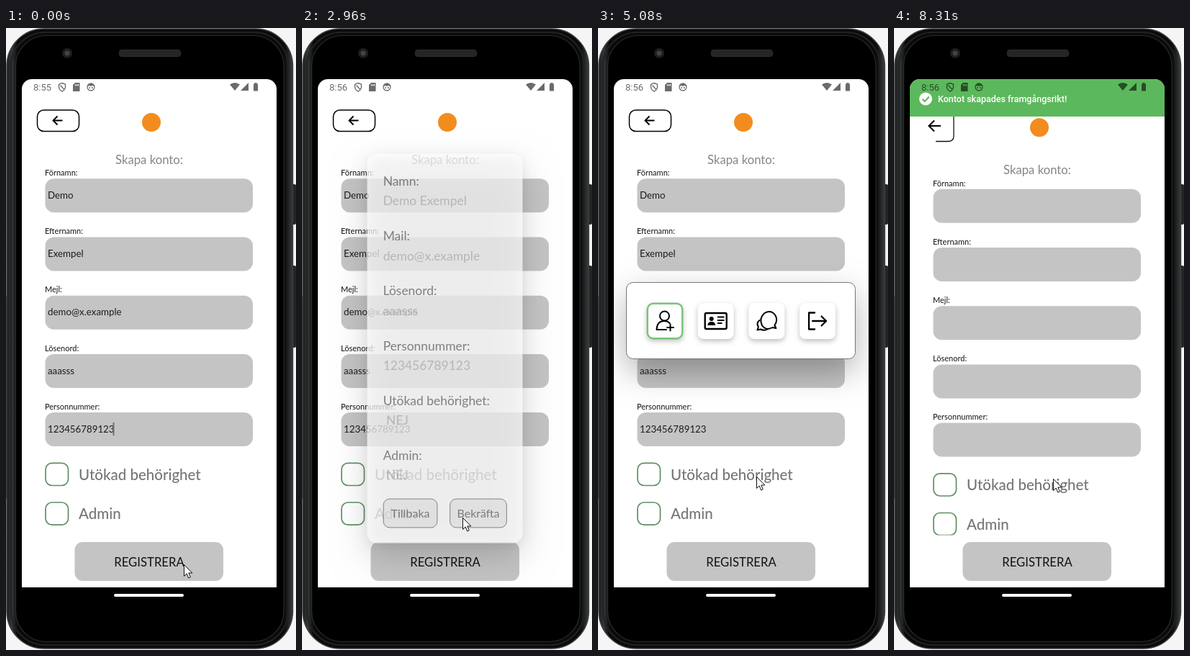
An HTML page with a canvas for the animation above (8.7 s loop, 403 by 864 pixels).

```html
<!DOCTYPE html>
<html lang="sv">
<head>
<meta charset="utf-8">
<title>Skapa konto</title>
<style>
html, body { margin: 0; width: 100%; height: 100%; overflow: hidden; background: #f5f5f5; }
canvas { display: block; width: 403px; height: 864px; }
</style>
</head>
<body>
<canvas id="stage"></canvas>
<script>
const W = 403, H = 864, LOOP = 8700;
const canvas = document.getElementById('stage');
const c = canvas.getContext('2d');
const dpr = window.devicePixelRatio || 1;
canvas.width = W * dpr;
canvas.height = H * dpr;

const GREY = '#c4c4c4', GREEN = '#5cb85c';
const FIELDS = [
  ['Förnamn:', 'Demo'],
  ['Efternamn:', 'Exempel'],
  ['Mejl:', 'demo@x.example'],
  ['Lösenord:', 'aaasss'],
  ['Personnummer:', '123456789123']
];
const SUMMARY = [
  ['Namn:', 'Demo Exempel'],
  ['Mail:', 'demo@x.example'],
  ['Lösenord:', 'aaasss'],
  ['Personnummer:', '123456789123'],
  ['Utökad behörighet:', ' NEJ'],
  ['Admin:', ' NEJ']
];
const POINTER = [
  [0, 247, 745], [30, 246, 745], [490, 222, 737], [1600, 222, 737], [1630, 222, 733],
  [2450, 220, 683], [2550, 220, 683], [2740, 223, 680], [3770, 223, 680],
  [4590, 220, 648], [4690, 220, 648], [5080, 220, 623], [5760, 220, 623], [5900, 221, 626]
];
const CARET_ON = [[0, 700], [3480, 3920], [4340, 4800], [5270, 5780], [5960, 6440], [6920, 7500], [7850, 8310]];

const ramp = (t, a, b) => Math.min(1, Math.max(0, (t - a) / (b - a)));
const smooth = p => p * p * (3 - 2 * p);

function box(x, y, w, h, r, fill, stroke, lw = 1) {
  c.beginPath();
  c.roundRect(x, y, w, h, r);
  if (fill) { c.fillStyle = fill; c.fill(); }
  if (stroke) { c.strokeStyle = stroke; c.lineWidth = lw; c.stroke(); }
}

function text(s, x, y, size, color, { align = 'left', weight = 400, family = 'Lato' } = {}) {
  c.font = `${weight} ${size}px ${family}, sans-serif`;
  c.textAlign = align;
  c.fillStyle = color;
  c.fillText(s, x, y);
}

function disc(x, y, r, fill) {
  c.beginPath();
  c.arc(x, y, r, 0, 7);
  c.fillStyle = fill;
  c.fill();
}

function line(d, color, lw) {
  c.strokeStyle = color;
  c.lineWidth = lw;
  c.stroke(new Path2D(d));
}

function area(d, color) {
  c.fillStyle = color;
  c.fill(new Path2D(d), 'evenodd');
}

function layer(draw, alpha = 1) {
  if (alpha <= 0) return;
  c.save();
  c.globalAlpha *= alpha;
  draw();
  c.restore();
}

function shadow(alpha, blur, dy) {
  c.shadowColor = `rgba(0,0,0,${alpha})`;
  c.shadowBlur = blur * dpr;
  c.shadowOffsetY = dy * dpr;
}

function drawPhone() {
  c.fillStyle = '#f5f5f5';
  c.fillRect(0, 0, W, H);
  box(397, 217, 6, 56, 2, '#242526');
  box(397, 330, 6, 114, 2, '#242526');
  box(0, 372, 5, 282, 2, '#3a3b3c');
  const rim = c.createLinearGradient(0, 0, W, 0);
  rim.addColorStop(0, '#161718');
  rim.addColorStop(.02, '#343738');
  rim.addColorStop(.04, '#0a0a0a');
  rim.addColorStop(.96, '#0a0a0a');
  rim.addColorStop(.985, '#343738');
  rim.addColorStop(1, '#161718');
  box(1, 1, 397.5, 861, 52, rim, '#3c3f40', 1.5);
  box(7, 6, 385, 851, 47, null, '#202223', 2);
  box(13.5, 10.5, 372.5, 842, 42, '#000', '#292b2c', 1.2);
  box(157.5, 30.5, 85, 9, 3, '#252525', '#303030');
  disc(85, 35, 7, '#1d1e1f');
  disc(85, 35, 3.5, '#414347');
  box(150, 786, 97, 4, 2, '#fff');
}

function drawStatus(t) {
  const ink = 'rgba(0,0,0,.58)';
  text(t < 720 ? '8:55' : '8:56', 38, 86.5, 13, ink, { family: 'Roboto' });
  line('M78 76.5L82.5 78.2V82Q82.2 86 78 88Q73.8 86 73.5 82V78.2Z M75.5 79.5L80.5 85', ink, 1.4);
  area('M96 76H102.5V88H93V79Z M96 78V80.5H97V78Z M98 78V80.5H99V78Z M100 78V80.5H101V78Z', ink);
  c.beginPath();
  c.arc(118, 82, 5, 0, 7);
  c.strokeStyle = ink;
  c.lineWidth = 1.3;
  c.stroke();
  area('M113 81Q118 74 123 81Q119 79.5 118 81Q116 79.5 113 81Z M115.5 82H117V84H115.5Z M119 82H120.5V84H119Z', ink);
  area('M311 78.5Q318 73.5 325 78.5L318 87Z', ink);
  area('M326 87L337 76V87Z', ink);
  area('M344 77.5H345.5V76H348.5V77.5H350V87.5H344Z', ink);
}

function drawForm(t, sent) {
  const dy = sent ? 14.5 : 0;
  if (sent) {
    line('M58 113.5H75Q83 113.5 83 121V150Q83 157.5 75 157.5H58', '#111', 1.3);
    line('M65 136H48.5M56 128.5L48.5 136L56 143.5', '#000', 2.1);
  } else {
    box(43.5, 114, 58, 29.5, 9, '#fff', '#000', 1.5);
    line('M78.5 128.5H65.5M71.5 122.5L65.5 128.5L71.5 134.5', '#000', 1.9);
  }
  disc(202, 131 + dy / 2, 13, '#f28c1e');

  layer(() => {
    c.translate(0, dy);
    text('Skapa konto:', 199, 188.5, 16.7, '#858585', { align: 'center' });
    FIELDS.forEach(([label, value], i) => {
      const y = 209.3 + i * 81.2;
      text(label, 54, y - 4.3, 11, '#151515');
      box(54.5, y, 288.5, 47, 12, GREY);
      if (!sent) text(value, 58, y + 27.6, 13.3, '#1c1c1c');
    });
    ['Utökad behörighet', 'Admin'].forEach((label, i) => {
      const y = 604.3 + i * 54.7;
      box(55, y, 31.5, 31.2, 9, '#fff', '#5f8f61', 1.7);
      text(label, 101, y + 23.4, 20.5, '#757575', { weight: 500 });
    });
  });
  if (CARET_ON.some(([a, b]) => t >= a && t < b)) {
    c.fillStyle = sent ? '#0b8378' : '#707070';
    if (sent) c.fillRect(58, 563, 2, 17);
    else c.fillRect(148.5, 548, 2, 18);
  }
  if (sent) {
    c.fillStyle = '#fff';
    c.fillRect(50, 704.5, 200, 9);
  }
  box(95.5, 714, 206.5, 54, 11, GREY);
  text('REGISTRERA', 199, 748, 16.7, '#111', { align: 'center' });
}

function drawSummary(t) {
  const p = smooth(ramp(t, 880, 1110)) * (1 - smooth(ramp(t, 2870, 3050)));
  layer(() => {
    const s = .92 + .08 * p;
    c.translate(198.5, 445);
    c.scale(s, s);
    c.translate(-198.5, -445);
    layer(() => {
      shadow(.3, 48, 20);
      box(86, 163, 225, 564, 14, '#fff');
      shadow(.14, 16, 4);
      box(86, 163, 225, 564, 14, '#fff');
    });
    SUMMARY.forEach(([label, value], i) => {
      const y = 209.5 + i * 79.4;
      text(label, 109, y, 18.2, '#0c0c0c');
      text(value, 109, y + 28.5, 18.2, '#888');
    });
    box(109.5, 663, 78, 41.5, 9, '#d3d3d3', '#111');
    box(206, 663, 82, 41.5, 9, '#d3d3d3', '#111');
    text('Tillbaka', 148.5, 690, 16.8, '#111', { align: 'center' });
    text('Bekräfta', 247, 690, 16.6, '#111', { align: 'center' });
  }, p);
}

// Icons are drawn around the centre of a card.
const ICONS = [
  () => {
    c.beginPath();
    c.arc(-.5, -7, 6.5, 0, 7);
    c.stroke();
    line('M-11.5 12Q-11 0 -1 0Q4 0 6.5 3M-11.5 12H2M7.5 4.5V13.5M3 9H12', '#000', 2);
  },
  () => {
    box(-15, -11, 30, 22, 2, null, '#000', 2.4);
    disc(-6, -3, 3, '#000');
    area('M-11.5 6Q-11 1 -6 1Q-1 1 -.5 6Z', '#000');
    line('M3 -5.5H11M3 -1H11M3 3H8', '#000', 2);
  },
  () => {
    line('M13 10L8 9Q-1 14 -6.5 6Q-11 -4 -3 -11Q6 -16 12 -8Q16 -1 11 6Z', '#000', 2);
    line('M-10 -1Q-15 3 -11.5 8L-13 12.5L-8.5 11.5Q-3 14 1 11.5', '#000', 2);
  },
  () => line('M-4 -11.5H-12V11.5H-4M-7 0H12M5.5 -6.5L12 0L5.5 6.5', '#000', 2.3)
];

function borderAlpha(t, i) {
  if (i === 0) {
    return t < 5420 ? .82 * ramp(t, 4690, 5000) : .9 + .1 * ramp(t, 5760, 6000);
  }
  const start = [0, 5960, 6090, 6100][i];
  return ramp(t, start, start + 450);
}

function drawMenu(t) {
  const open = smooth(ramp(t, 3230, 3650)) * (1 - smooth(ramp(t, 7770, 8220)));
  if (open <= 0) return;
  const w = 318 * open;
  const x = 198.5 - w / 2, r = Math.min(9, w / 2);
  layer(() => {
    shadow(.3, 44, 17);
    box(x, 353.5, w, 106, r, '#fff');
  }, Math.min(1, open * 3));
  box(x, 353.5, w, 106, r, '#fff', '#777');

  const cards = ramp(t, 3550, 3650) * (1 - ramp(t, 7700, 7800));
  layer(() => {
    for (let i = 0; i < 4; i++) {
      layer(() => {
        c.translate(93 + i * 70.7, 407);
        layer(() => {
          shadow(.25, 7, 3);
          box(-25, -25, 50, 50, 8, '#fff');
        });
        const green = borderAlpha(t, i);
        layer(() => box(-24.2, -24.2, 48.4, 48.4, 8, null, GREEN, 2.4), green);
        const shown = ramp(t, 3760 + i * 80, 4150 + i * 80) * (1 - ramp(t, 7480, 7740));
        layer(() => {
          c.strokeStyle = '#000';
          c.lineWidth = 2;
          c.lineCap = c.lineJoin = 'round';
          ICONS[i]();
        }, shown);
      });
    }
  }, cards);
}

function drawToast(t) {
  const p = ramp(t, 5920, 6560);
  layer(() => {
    c.translate(0, -52 * (1 - p));
    c.fillStyle = GREEN;
    c.fillRect(22, 71, 354, 52);
    disc(44, 98.5, 9, '#fff');
    line('M39.5 98.7L42.8 102L48.7 95.5', GREEN, 2.2);
    text('Kontot skapades framgångsrikt!', 61, 103, 12.5, '#fff', { family: 'Roboto', weight: 500 });
  }, p);
}

function drawPointer(t) {
  let i = POINTER.findIndex(k => k[0] > t);
  if (i < 0) i = POINTER.length;
  const a = POINTER[i - 1], b = POINTER[i] || a;
  const p = a === b ? 0 : smooth(ramp(t, a[0], b[0]));
  layer(() => {
    c.translate(Math.round(a[1] + (b[1] - a[1]) * p) + .5, Math.round(a[2] + (b[2] - a[2]) * p) + .5);
    const shape = 'M0 0V16L3.7 12.5L6.2 18.5L8.8 17.4L6.3 11.5H11.4Z';
    area(shape, '#fff');
    line(shape, '#111', 1);
  });
}

function render(t) {
  const sent = t >= 5780;
  c.setTransform(dpr, 0, 0, dpr, 0, 0);
  drawPhone();
  layer(() => {
    box(22, 71, 354, 706, [14, 14, 0, 0], '#fff');
    c.clip();
    drawForm(t, sent);
    drawSummary(t);
    drawMenu(t);
    drawToast(t);
    drawStatus(t);
    drawPointer(t);
  });
}

const start = performance.now();
function tick() {
  render((performance.now() - start) % LOOP);
  requestAnimationFrame(tick);
}
tick();
</script>
</body>
</html>
```
